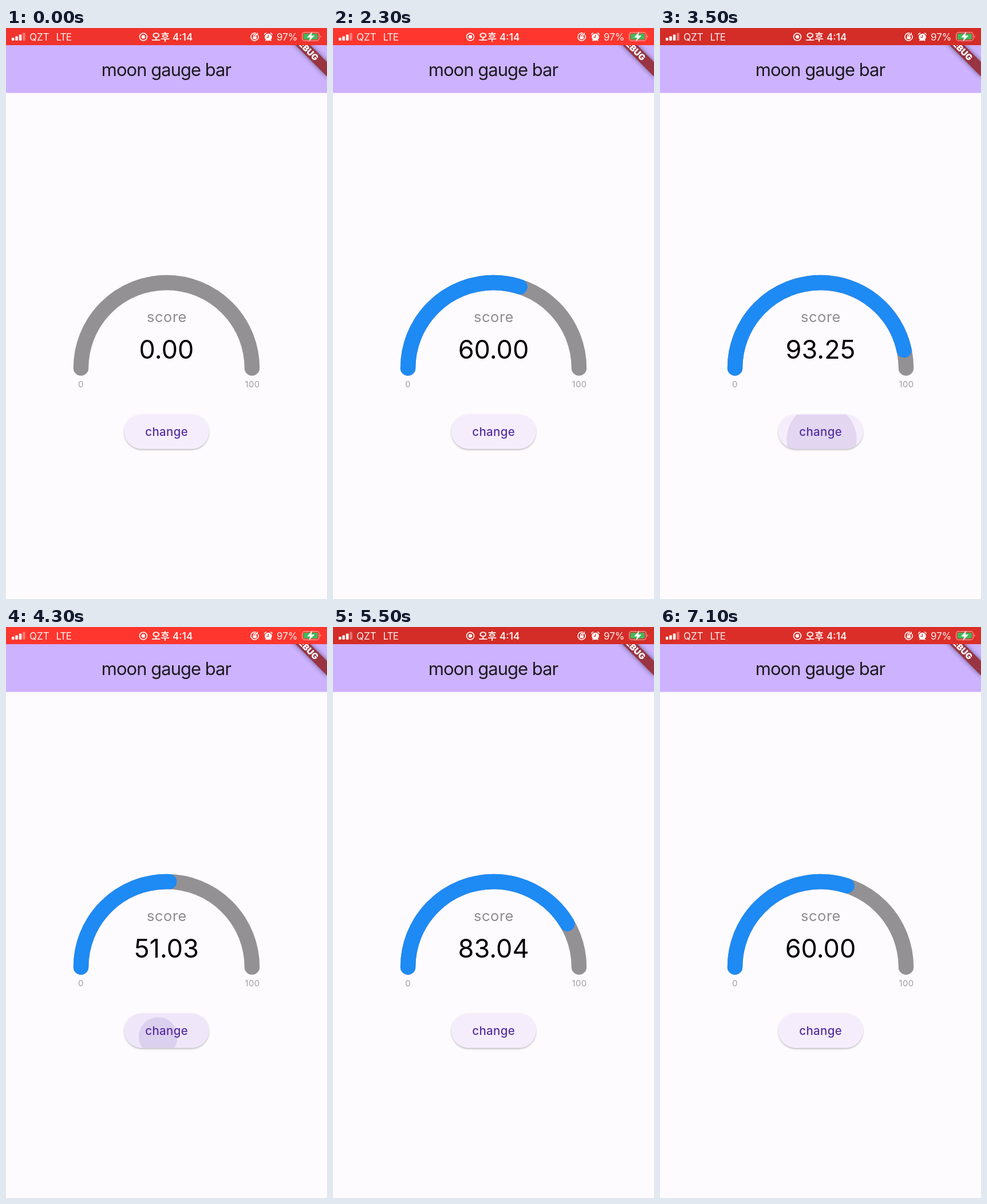
Animation of 561 by 998 pixels, one loop 7.2 s. Source, as an HTML page:

```html
<!DOCTYPE html>
<html lang="ko">
<head>
<meta charset="utf-8">
<title>moon gauge bar</title>
<style>
  html, body { margin: 0; width: 100%; height: 100%; overflow: hidden; background: #fefbff; }
  svg { display: block; width: 561px; height: 998px; font-family: Inter, "Noto Sans CJK KR", "Noto Sans CJK", sans-serif; }
  .mid { text-anchor: middle; }
  .status { font-size: 17px; fill: #fff; fill-opacity: .93; }
  .gauge { fill: none; stroke-width: 26.5; stroke-linecap: round; }
  .line { fill: none; stroke: #fff; stroke-width: 1.6; }
  .limit { font-size: 15px; letter-spacing: .4px; fill: #a09da1; }
</style>
</head>
<body>
<svg viewBox="0 0 561 998">
  <defs>
    <clipPath id="pill"><rect x="207" y="675.5" width="147.5" height="60" rx="30"/></clipPath>
    <filter id="soft" x="-30%" y="-100%" width="160%" height="300%"><feGaussianBlur stdDeviation="4.5"/></filter>
    <filter id="lift" x="-10%" y="-10%" width="120%" height="130%">
      <feDropShadow dx="0" dy="1.5" stdDeviation="1.4" flood-color="#000" flood-opacity=".32"/>
    </filter>
  </defs>

  <rect width="561" height="998" fill="#fefbff"/>
  <rect y="29" width="561" height="84.5" fill="#cdb2ff"/>
  <text class="mid" x="280" y="84" font-size="31" letter-spacing="-1" fill="#1c1a20">moon gauge bar</text>

  <g transform="translate(561 0) rotate(45)">
    <rect x="-60" y="42" width="120" height="18" opacity=".5" filter="url(#soft)"/>
    <rect x="-60" y="42" width="120" height="18" fill="#993442"/>
    <text class="mid" y="56.3" font-size="15" font-weight="900" fill="#fff">DEBUG</text>
  </g>

  <rect id="bar" width="561" height="30"/>
  <g fill="#fff">
    <rect x="10" y="17" width="4.5" height="5" rx="1"/>
    <rect x="16.3" y="14.5" width="4.5" height="7.5" rx="1"/>
    <rect x="22.8" y="11.5" width="4.5" height="10.5" rx="1"/>
    <rect x="29.2" y="8.5" width="4.5" height="13.5" rx="1" opacity=".35"/>
    <circle cx="240" cy="15.5" r="3.2"/>
    <rect x="431.5" y="14.5" width="6.5" height="5" rx="1"/>
    <path d="M440 7.5v5h-4z"/>
    <circle cx="458.5" cy="16" r="6.3"/>
    <path d="M451 12.5a4 4 0 0 1 5-4.2zM466 12.5a4 4 0 0 0-5-4.2zM453 22l2-2 1 1-2 2zM464 22l-2-2-1 1 2 2z"/>
    <path d="M549.3 12.5q2.5 2.2 0 5z" opacity=".6"/>
  </g>
  <g class="line">
    <circle cx="240" cy="15.5" r="6.5"/>
    <path d="M440.6 12.5a6.7 6.7 0 1 1-3.4-3.2M433 14.5v-1.3a1.8 1.8 0 0 1 3.6 0v1.3"/>
    <path d="M458.5 12v4.3h-3.3" stroke="#d8322a" stroke-width="1.3"/>
    <rect x="517.7" y="7.7" width="29.6" height="14.6" rx="4.3" stroke-width="1.3" opacity=".55"/>
  </g>
  <rect x="519.8" y="9.8" width="25" height="10.4" rx="2.5" fill="#43b75a"/>
  <path d="M535.5 6l-9.5 10.5h5.5l-2.3 7.5 10-10.8h-5.7z" fill="#fff"/>
  <text class="status" x="41" y="21.5">QZT</text>
  <text class="status" x="87.5" y="21.5" letter-spacing="-.9">LTE</text>
  <text class="status" x="254.5" y="21.5" font-weight="600" font-size="17">오후</text>
  <text class="status" x="291" y="21.5" font-weight="600">4:14</text>
  <text class="status" x="473" y="21.5">97%</text>

  <path class="gauge" stroke="#949194" d="M131 594.5a149.5 149.5 0 0 1 299 0"/>
  <path class="gauge" id="fill" stroke="#1e8af4" pathLength="100" d="M131 594.5a149.5 149.5 0 0 1 299 0"/>
  <text class="mid" x="281" y="514" font-size="25.5" letter-spacing=".5" fill="#8f8c90">score</text>
  <text class="mid" id="score" x="280.5" y="577.5" font-size="45"></text>
  <text class="mid limit" x="131" y="628">0</text>
  <text class="mid limit" x="430.5" y="628">100</text>

  <rect x="207" y="675.5" width="147.5" height="60" rx="30" fill="#f6edfc" filter="url(#lift)"/>
  <g clip-path="url(#pill)" fill="#5530a5">
    <rect id="tint" x="207" y="675" width="148" height="61"/>
    <circle id="ripple"/>
  </g>
  <text class="mid" x="280.7" y="713" font-size="20.5" font-weight="500" letter-spacing=".35" fill="#5530a0">change</text>
</svg>
<script>
const LOOP = 7200, STEP = 100;
// [time, score], linear in between
const keys = [[0, 0], [691, 0], [1691, 60], [2483, 60], [3454, 95.68],
  [4400, 45.75], [5100, 98.4], [6100, 60], [LOOP, 60]];
// [press, release, x, y]
const taps = [[560, 691, 278, 718], [2370, 2483, 280, 718], [3290, 3454, 282.5, 719],
  [4206, 4400, 266, 716], [4960, 5100, 272, 717]];

const $ = id => document.getElementById(id);
const set = (id, attrs) => { for (const k in attrs) $(id).setAttribute(k, attrs[k]); };
const clamp = p => Math.min(1, Math.max(0, p));
const easeOut = p => 1 - (1 - clamp(p)) ** 2;
const mix = (a, b, p) => a + (b - a) * p;

function scoreAt(t) {
  const i = keys.findIndex(k => k[0] > t);
  const [t0, a] = keys[i - 1], [t1, b] = keys[i];
  return mix(a, b, (t - t0) / (t1 - t0));
}

function drawTap(t) {
  const tap = taps.find(([down, up]) => t >= down && t < up + 375);
  if (!tap) {
    set('ripple', { opacity: 0 });
    set('tint', { opacity: 0 });
    return;
  }
  const [down, up, cx, cy] = tap, held = Math.min(t, up) - down, since = t - up;
  const r = mix(mix(24, 80, easeOut(held / 1000)), 96, easeOut(since / 225));
  const fade = clamp((t - down) / 75) * (1 - clamp((since - 225) / 150));
  set('ripple', { cx, cy, r, opacity: .12 * fade });
  set('tint', { opacity: .08 * clamp(held / 200) * (1 - clamp(since / 45)) });
}

function draw(t) {
  const glow = .5 + .5 * Math.cos((t - 2400) / 1000 * Math.PI);
  set('bar', { fill: `rgb(${mix(211, 255, glow)},${mix(44, 54, glow)},${mix(39, 46, glow)})` });
  const score = scoreAt(t);
  $('score').textContent = score.toFixed(2);
  set('fill', { 'stroke-dasharray': `${score} 200`, visibility: score > 0 ? 'visible' : 'hidden' });
  drawTap(t);
}

const start = performance.now();
function tick() {
  const t = (performance.now() - start) % LOOP;
  draw(Math.floor(t / STEP) * STEP);
  requestAnimationFrame(tick);
}
tick();
</script>
</body>
</html>
```
